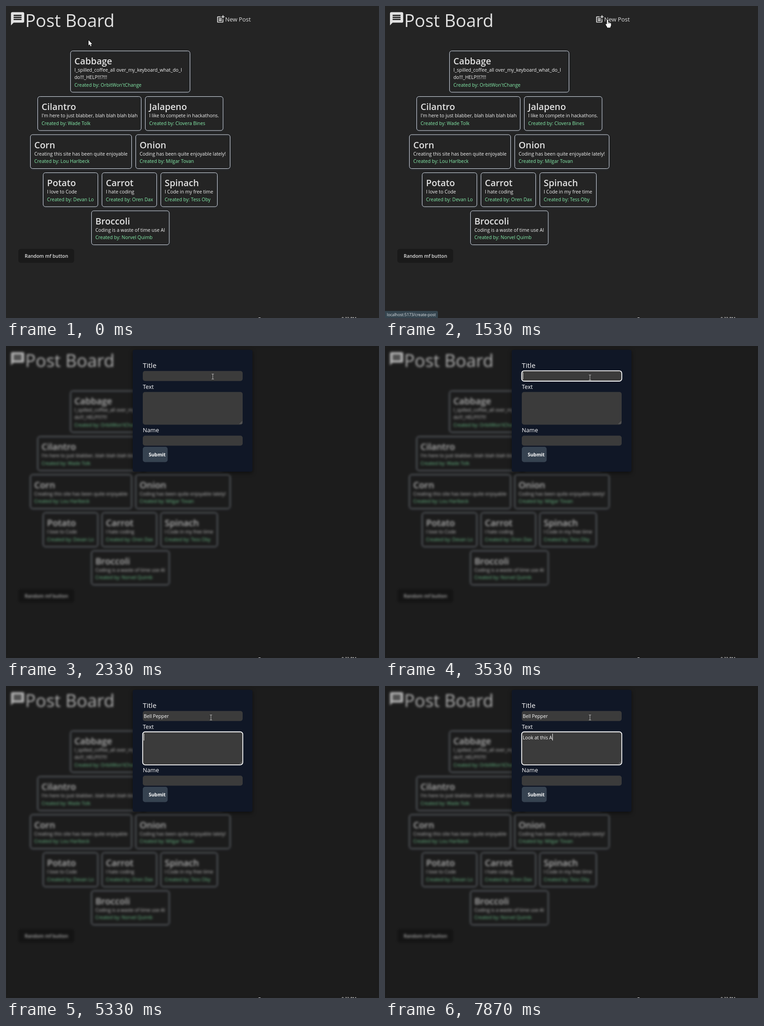
Animation, 818 px wide and 684 px high, one loop 8000 ms. Source, as an HTML page with a canvas:

```html
<!DOCTYPE html>
<html lang="en">
<head>
<meta charset="utf-8">
<title>Post Board</title>
<style>
html, body { margin: 0; width: 100%; height: 100%; overflow: hidden; background: #242424; }
canvas { display: block; }
</style>
</head>
<body>
<canvas id="stage" width="818" height="684"></canvas>
<script>
const W = 818, H = 684, LOOP = 8000, TICK = 200 / 3;
const FONT = '"Open Sans", "Noto Sans", sans-serif';
const LIGHT = '#e2e2e2', FIELD = '#3b3b3b';
const stage = document.getElementById('stage').getContext('2d');

const MESSAGE_ICON = new Path2D('M20 2H4c-1.1 0-2 .9-2 2v18l4-4h14c1.1 0 2-.9 2-2V4c0-1.1-.9-2-2-2z' +
  'M18 14H6v-2h12zM18 11H6V9h12zM18 8H6V6h12z');
const ADD_ICON = new Path2D('M17 19H5V7h7V5H5c-1.1 0-2 .9-2 2v12c0 1.1.9 2 2 2h12c1.1 0 2-.9 2-2v-7h-2z' +
  'M19 2h-2v3h-3v2h3v3h2V7h3V5h-3zM7 9h8v2H7zM7 12h8v2H7zM7 15h8v2H7z');
const ARROW = new Path2D('M0 0V11.6L2.7 9.1 4.6 13.4 6.5 12.6 4.6 8.4H8.2z');
const HAND = new Path2D('M-1.4 1.2Q-1.4 0 0 0T1.4 1.2V5.8L6 6.8Q7.7 7.4 7.7 9V13L6.3 16V17.5H-.8V16.2' +
  'L-4 11Q-4.4 9.4 -3.2 9.2T-1.4 10.6z');

// left, right, top, title, lines, author
const CARDS = [
  [141.5, 403.5, 98.5, 'Cabbage', ['I_spilled_coffee_all over_my_keyboard_what_do_I', 'do!!!_HELP!!!?!!!'], "OrbitWon'tChange"],
  [69.5, 296.5, 198.5, 'Cilantro', ["I'm here to just blabber, blah blah blah blah"], 'Wade Tolk'],
  [305.5, 476, 198.5, 'Jalapeno', ['I like to compete in hackathons.'], 'Clovera Bines'],
  [53.5, 275.5, 282, 'Corn', ['Creating this site has been quite enjoyable'], 'Lou Harlbeck'],
  [284.5, 491.5, 282, 'Onion', ['Coding has been quite enjoyable lately!'], 'Milgar Tovan'],
  [81.5, 201.5, 365.5, 'Potato', ['I love to Code'], 'Devan Lo'],
  [210.5, 330.5, 365.5, 'Carrot', ['I hate coding'], 'Oren Dax'],
  [339.5, 463.5, 365.5, 'Spinach', ['I Code in my free time'], 'Tess Oby'],
  [187.5, 358, 449, 'Broccoli', ['Coding is a waste of time use AI'], 'Norvel Quimb']
];

// time, x, y of the pointer's hot spot
const POINTER = [
  [0, 181, 75], [267, 98, 114], [400, 98, 114], [867, 462, 34], [1000, 475, 49], [1267, 475, 49],
  [1533, 488, 30], [1867, 488, 30], [2333, 453, 67], [2600, 453, 67], [2733, 449, 69]
];

const TITLE_KEYS = [3600, 3800, 3930, 4000, 4130, 4400, 4530, 4600, 4670, 4800, 4870];
const TEXT_KEYS = [6070, 6270, 6400, 6670, 7070, 7130, 7200, 7330, 7400, 7470, 7600, 7730, 7730, 7870];
const LINK_IN = 870, OPEN = 1730, LINK_OUT = 2130, FOCUS = 2470, TAB = 5330;

function text(c, str, x, y, size, color = '#fff', weight = 400) {
  c.font = `${weight} ${size}px ${FONT}`;
  c.fillStyle = color;
  c.fillText(str, x, y);
}

function box(c, x, y, w, h, r, fill) {
  c.beginPath();
  c.roundRect(x, y, w, h, r);
  if (fill) { c.fillStyle = fill; c.fill(); }
}

function icon(c, path, x, y, scale) {
  c.save();
  c.translate(x, y);
  c.scale(scale, scale);
  c.fillStyle = LIGHT;
  c.fill(path, 'evenodd');
  c.restore();
}

function drawCard(c, [left, right, top, title, lines, author]) {
  const x = left + 8.5, extra = (lines.length - 1) * 16;
  c.save();
  c.shadowColor = 'rgba(80,120,180,.25)';
  c.shadowBlur = 4;
  c.shadowOffsetY = 1.5;
  box(c, left, top, right - left, 74.5 + extra, 5);
  c.strokeStyle = '#dbe2ec';
  c.lineWidth = 1;
  c.stroke();
  c.restore();
  text(c, title, x, top + 29.5, 19.8, LIGHT, 600);
  lines.forEach((line, i) => text(c, line, x, top + 45.5 + i * 16, 10.4, '#f4f4f4'));
  text(c, 'Created by: ' + author, x, top + 62 + extra, 10.4, '#86efac');
}

function drawBoard(c) {
  c.fillStyle = '#242424';
  c.fillRect(0, 0, W, H);
  icon(c, MESSAGE_ICON, 8, 10.5, 1.45);
  text(c, 'Post Board', 42, 46, 38.4, LIGHT);
  icon(c, ADD_ICON, 460.5, 18.5, 0.85);
  text(c, 'New Post', 480.5, 33.5, 12.9, LIGHT);
  CARDS.forEach(card => drawCard(c, card));
  box(c, 27, 532.5, 122.5, 30.5, 5.5, '#1a1a1a');
  text(c, 'Random mf button', 41, 552, 10.4, LIGHT, 600);
}

function layer(paint) {
  const canvas = document.createElement('canvas');
  canvas.width = W;
  canvas.height = H;
  paint(canvas.getContext('2d'));
  return canvas;
}

const board = layer(drawBoard);
const dimmed = layer(c => {
  c.fillStyle = '#242424';
  c.fillRect(0, 0, W, H);
  c.filter = 'blur(2.4px)';
  c.drawImage(board, 0, 0);
  c.filter = 'none';
  c.fillStyle = 'rgba(0,0,0,.22)';
  c.fillRect(0, 0, W, H);
});

function drawField(c, y, h, focused) {
  box(c, 300, y, 219, h, 5, FIELD);
  if (!focused) return;
  box(c, 299.7, y - 0.3, 219.6, h + 0.6, 5.5);
  c.strokeStyle = '#fff';
  c.lineWidth = 1.8;
  c.stroke();
}

function drawTyped(c, str, baseline, caret) {
  text(c, str, 302, baseline, 10.3);
  if (caret) c.fillRect(Math.round(302 + c.measureText(str).width), baseline - 12, 1, 15);
}

const typed = (str, keys, t) => str.slice(0, keys.filter(k => k <= t).length);

function drawForm(c, t) {
  const onTitle = t >= FOCUS && t < TAB, onText = t >= TAB;
  const blink = !(t >= 3000 && t < 3530) && !(t >= 5870 && t < 6070);
  c.save();
  c.shadowColor = 'rgba(0,0,0,.5)';
  c.shadowBlur = 9;
  c.shadowOffsetY = 3;
  box(c, 278, 8.5, 262.5, 267, 4, '#101726');
  c.restore();

  text(c, 'Title', 300, 47.5, 15.2, '#fff', 500);
  text(c, 'Text', 300, 93.5, 12.6, '#fff', 500);
  text(c, 'Name', 300, 189, 12.7, '#fff', 500);
  drawField(c, 54.7, 22, onTitle);
  drawField(c, 100.8, 71.7, onText);
  drawField(c, 196.5, 22, false);

  c.beginPath();
  c.moveTo(512.5, 171); c.lineTo(518, 165.5);
  c.moveTo(515.5, 171); c.lineTo(518, 168.5);
  c.strokeStyle = '#a0a0a0';
  c.lineWidth = 0.7;
  c.stroke();

  box(c, 300, 221, 54.5, 33.5, 5, '#364250');
  text(c, 'Submit', 313, 241.5, 10.4, '#fff', 700);
  drawTyped(c, typed('Bell Pepper', TITLE_KEYS, t), 70, onTitle && blink);
  drawTyped(c, typed('Look at this A', TEXT_KEYS, t), 116.5, onText && blink);
}

function drawStatus(c) {
  box(c, -1, 668.5, 117, 17, [0, 3, 0, 0], '#35454f');
  text(c, 'localhost:5173/create-post', 4, 679.5, 8.7, '#dfe3e6');
}

function drawTaskbar(c) {
  text(c, '9:33 PM', 736, 688.5, 8.6);
  c.beginPath();
  c.arc(556, 686.5, 3.6, 0, 2 * Math.PI);
  c.fill();
}

function pointerAt(t) {
  const now = Math.floor((t + 4) / TICK) * TICK;
  const next = POINTER.findIndex(p => p[0] > now);
  if (next < 0) return POINTER[POINTER.length - 1].slice(1);
  const [t0, x0, y0] = POINTER[next - 1], [t1, x1, y1] = POINTER[next];
  const k = (now - t0) / (t1 - t0);
  return [Math.round(x0 + (x1 - x0) * k), Math.round(y0 + (y1 - y0) * k)];
}

function drawPointer(c, t) {
  const [x, y] = pointerAt(t);
  c.save();
  c.translate(x, y);
  if (t >= OPEN && y > 54) {
    c.fillStyle = '#b4b4b4';
    c.fillRect(0, -6, 1, 12);
    for (const end of [-6, 5]) {
      c.fillRect(-2, end, 2, 1);
      c.fillRect(1, end, 2, 1);
    }
  } else {
    const shape = t >= LINK_IN && t < OPEN ? HAND : ARROW;
    c.lineJoin = 'round';
    c.lineWidth = 1.4;
    c.strokeStyle = '#000';
    c.stroke(shape);
    c.fillStyle = '#fff';
    c.fill(shape);
    if (shape === HAND) {
      c.lineWidth = 0.6;
      c.beginPath();
      for (const fx of [1.4, 3.6, 5.7]) {
        c.moveTo(fx, 6.3);
        c.lineTo(fx, 9);
      }
      c.stroke();
    }
  }
  c.restore();
}

function render(t) {
  const open = t >= OPEN;
  stage.drawImage(open ? dimmed : board, 0, 0);
  if (open) drawForm(stage, t);
  if (t >= LINK_IN && t < LINK_OUT) drawStatus(stage);
  drawTaskbar(stage);
  drawPointer(stage, t);
}

const start = performance.now();
function loop() {
  render((performance.now() - start) % LOOP);
  requestAnimationFrame(loop);
}
loop();
</script>
</body>
</html>
```
